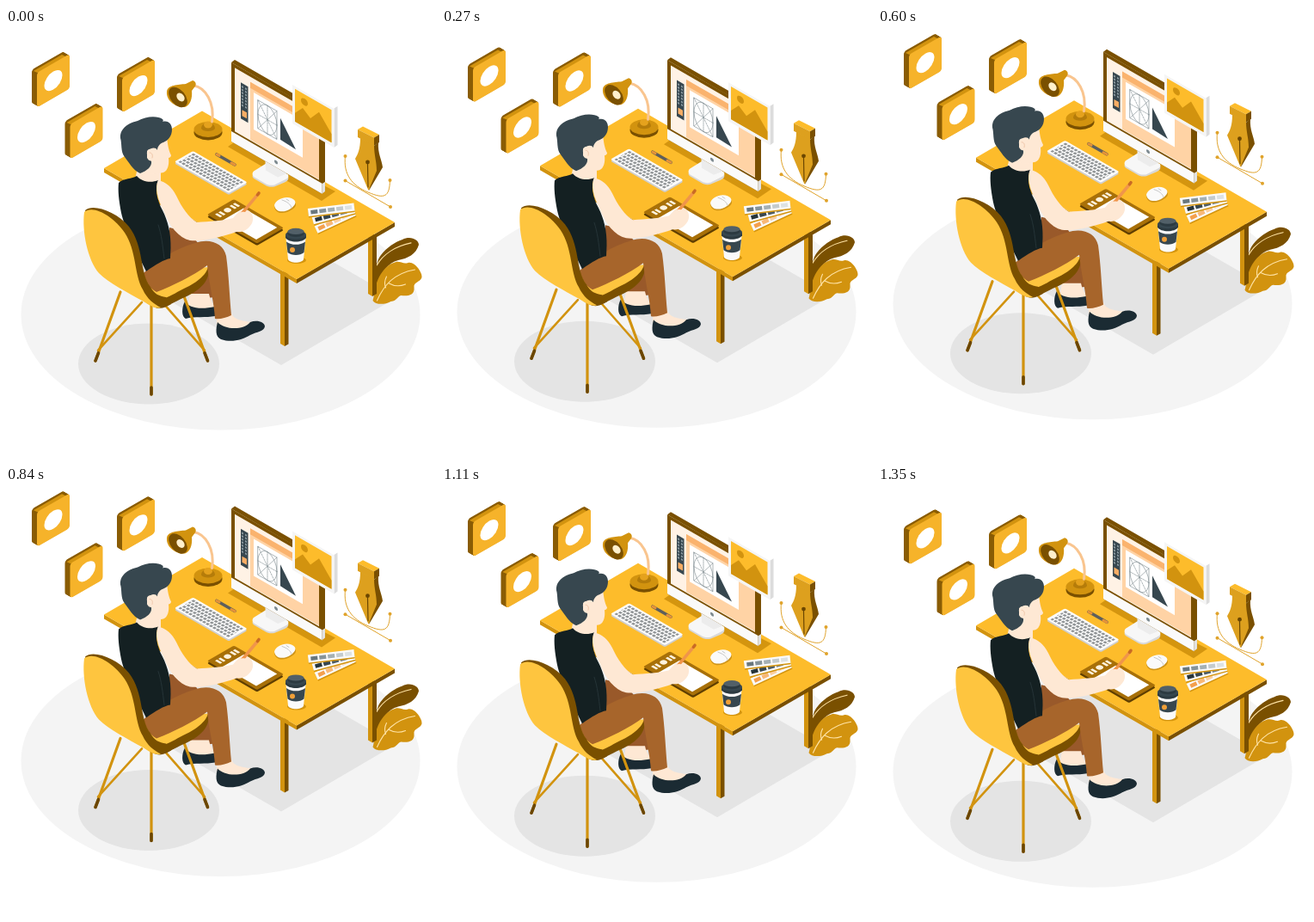
An HTML page that plays this animation: 500 by 500 pixels, repeating every 1380 ms.

```html
<!DOCTYPE html>
<html lang="en">
<head>
<meta charset="utf-8">
<title>Designer at a desk</title>
<style>
  html, body { margin: 0; width: 100%; height: 100%; overflow: hidden; background: #fff; }
  svg { display: block; width: 100vw; height: 100vh; }
  .gold { fill: #d2930f; }
  .brown { fill: #7a5000; }
  .sun { fill: #fdbc2b; }
  .skin { fill: #fee8d4; }
  .slate { fill: #37474f; }
  .ink { fill: #142022; }
  .shoe { fill: #1b2b33; }
  .line { fill: none; stroke-linecap: round; stroke-linejoin: round; }
</style>
</head>
<body>
<svg viewBox="0 0 500 500" xmlns="http://www.w3.org/2000/svg">
  <g id="room">
    <ellipse cx="249.500" cy="333" rx="232" ry="134.500" fill="#f4f4f4"/>
    <ellipse cx="166" cy="390.500" rx="82" ry="47" fill="#e4e4e4"/>
    <path d="M320 392L453 314L262 204L122 278Z" fill="#e4e4e4"/>

    <g id="plant">
      <path class="brown" d="M430 299C429 282 431 270 436 264C443 255 452 249 461 246C470 241 480 246 480 252C477 263 467 268 456 270C444 273 436 284 433 301Z"/>
      <path class="line" d="M431 276C438 264 452 254 471 250" stroke="#ffe3a6" stroke-width="1.200"/>
      <g transform="translate(-.5 5)">
        <path class="gold" d="M428 308C430 288 439 271 454 267C459 266 463 270 468 268C476 266 485 280 484 285C482 291 474 290 475 297C476 306 467 307 460 306C455 307 456 312 448 313C441 317 430 317 427 312Z"/>
        <path class="line" d="M432 312C440 294 452 280 476 276M442 297C440 292 441 288 443 284M446 292C453 296 460 295 465 293" stroke="#ffe3a6" stroke-width="1.100"/>
      </g>
    </g>

    <g id="desk">
      <path class="gold" d="M319 283H324V370L319 367ZM421 240H426V312L421 309Z"/>
      <path class="brown" d="M324 283H328.500V367.500L324 370ZM426 240H431V309L426 312Z"/>
      <path class="gold" d="M114 163L338 292V297L114 168Z"/>
      <path class="brown" d="M338 292L452 226V231L338 297Z"/>
      <path class="sun" d="M114 163L228 96.500L452 226L338 292Z"/>
    </g>

    <g id="lamp">
      <ellipse class="brown" cx="235" cy="121.500" rx="16.500" ry="9"/>
      <ellipse class="gold" cx="235" cy="118" rx="16.500" ry="9"/>
      <path d="M227 117C227 108 243 108 243 117C241 121 229 121 227 117Z" fill="#b57c0a"/>
      <ellipse cx="235" cy="112.500" rx="5" ry="4" fill="#e5a21d"/>
      <path class="line" d="M218 67C232 69 243 87 239.500 109" stroke="#f9c58f" stroke-width="3"/>
      <path class="gold" d="M187 74C188 66 200 66 209 65L217 61C221 62 222 66 219 69L216 73C217 82 214 90 208 92C197 93 186 84 187 74Z"/>
      <ellipse class="brown" cx="200" cy="80.500" rx="8.500" ry="13.500" transform="rotate(-40 200 80.500)"/>
      <ellipse cx="203" cy="80.500" rx="4" ry="5.500" fill="#fff0cc" transform="rotate(-40 203 80.500)"/>
    </g>

    <g id="monitor">
      <path d="M258 138L268 131L383 190L367 201Z" fill="#d4950f"/>
      <g transform="translate(0 -2.500)">
        <path d="M288 172L304 162L328 175C329 178 328 180 324 182L312 187C308 188 304 187 301 185L289 178C286 176 286 174 288 172Z" fill="#d8d8d8"/>
        <path d="M288 169L304 159L328 173C329 176 328 177 324 179L312 185C308 186 304 185 301 183L289 176C286 174 286 171 288 169Z" fill="#f7f7f7"/>
        <path d="M301 148L326 162V172L316 176L302 168Z" fill="#ececec"/>
      </g>
      <path class="brown" d="M262 40L266 37L371 97.500V179L367 182V101Z"/>
      <path d="M367 181.500L371 179V190L367 193Z" fill="#e2e2e2"/>
      <g transform="matrix(1 .577 0 1 262 40)">
        <rect class="brown" width="105.500" height="92"/>
        <rect y="80" width="105.500" height="12" fill="#fafafa"/>
        <rect x="4" y="4" width="98" height="74" fill="#fff2e5"/>
        <rect x="22" y="10" width="80" height="67" fill="#ffd3a5"/>
        <rect x="22" y="10" width="80" height="7" fill="#fab36e"/>
        <rect x="26" y="20" width="57" height="43" fill="#fff"/>
        <rect class="slate" x="11" y="17" width="8.500" height="42"/>
        <path d="M13 20V44M17 20V44" stroke="#8b9aa0" stroke-width="2" stroke-dasharray="2 1.600"/>
        <rect x="12.500" y="48" width="5.500" height="7" fill="#f7ad64"/>
        <g class="line" stroke="#7d898f" stroke-width=".55">
          <rect x="31" y="26" width="22" height="33"/>
          <ellipse cx="42" cy="42.500" rx="11" ry="16.500"/>
          <path d="M31 26L53 59M53 26L31 59M42 26V59M31 42.500H53" stroke-dasharray="1.500 1"/>
        </g>
        <path class="slate" d="M57 32V57L75 58Z"/>
        <circle cx="52" cy="86" r="2" fill="#7c898f"/>
      </g>
    </g>

    <g id="card">
      <path d="M333 66L337 63.500L385.500 91L381.500 94Z" fill="#fff"/>
      <path d="M381.500 93.500L385.500 91V136L381.500 139Z" fill="#dcdcdc"/>
      <g transform="matrix(1 .577 0 1 333 66)">
        <rect width="48.500" height="45" fill="#f5f5f5"/>
        <rect class="sun" x="3" y="3" width="42.500" height="38"/>
        <circle class="gold" cx="14" cy="12" r="4"/>
        <path class="gold" d="M3 31L12 20L21 27L31 14L45.500 31V41H3Z"/>
      </g>
    </g>

    <g id="keyboard" transform="matrix(.866 .5 -.866 .5 217.500 143)">
      <rect x="2" y="2" width="73" height="25" rx="2" fill="#cfcfcf"/>
      <rect width="73" height="25" rx="2" fill="#fbfbfb"/>
    </g>

    <path class="line" d="M245 147L266 159" stroke="#5e5f5c" stroke-width="3.600"/>
    <path class="line" d="M245 147L248 148.500M262 157L266 159" stroke="#e79338" stroke-width="3"/>

    <g transform="matrix(.866 .5 -.866 .5 265 199)">
      <rect x="2.500" y="2.500" width="67" height="36" rx="2" fill="#5f3e00"/>
      <rect width="67" height="36" rx="2" fill="#a87008"/>
      <rect x="17" y="4" width="45" height="28" fill="#fff"/>
      <path d="M5 29H12M5 24.500H12M5 9.500H12M5 5H12" stroke="#fff3de" stroke-width="2.800"/>
      <circle cx="8.500" cy="17" r="3.600" fill="#fff3de"/>
    </g>

    <path d="M312 208C314 200 326 196 333 200C340 204 337 209 331 212C323 217 313 216 312 208Z" fill="#cf9418"/>
    <path d="M312 206C314 199 325 195 332 198C339 201 337 206 331 210C324 215 313 215 312 206Z" fill="#fafafa"/>
    <path class="line" d="M321 200C327 202 331 205 332 209M326 199L329 201" stroke="#c7c7c7"/>

    <g id="swatches"></g>

    <g id="cup" transform="translate(-1 0)">
      <ellipse cx="339" cy="270" rx="11" ry="4" fill="#d4950f"/>
      <path d="M326.500 244L329 269C331 274 345 274 347 269L349.500 244Z" fill="#fafafa"/>
      <path class="slate" d="M327 248.500C333 253 343 253 349 248.500L347.500 261C343 265 333 265 328.500 261Z"/>
      <circle cx="334" cy="258" r="3" fill="#f0a038"/>
      <path d="M326 241V244C330 250 346 250 350 244V241Z" fill="#2c3a41"/>
      <ellipse class="slate" cx="338" cy="240.500" rx="12" ry="5"/>
      <path d="M328.500 236.500V240C332 244 344 244 347.500 240V236.500Z" fill="#2c3a41"/>
      <ellipse cx="338" cy="236.500" rx="9.500" ry="3.600" fill="#526068"/>
    </g>

    <g id="farleg">
      <path d="M207 296L236 284L242 313L219 316Z" fill="#99592a"/>
      <path class="skin" d="M214 309L236 309C238 319 243 323 243 327L226 331L211 326Z"/>
      <path class="shoe" d="M208 318C212 325 225 328 243 324V335C233 337 219 335 209 338C204 336 204 325 208 318Z"/>
    </g>

    <g class="line" stroke="#d2930f">
      <path d="M133 307L104 387M169 322V426M207 312L234.500 387" stroke-width="3.200"/>
      <path d="M158 319L107 375M181 318L231 375" stroke-width="2.600"/>
    </g>
    <path class="line" d="M107.500 378L104 387M169 418V426M231 378L234.500 387" stroke="#6b4600" stroke-width="3.600"/>
    <path class="brown" d="M156 285L236 279C237 296 223 306 208 313C194 319 184 327 174 325Z"/>
    <path d="M158 286L235 278C232 290 216 299 203 305C190 312 180 319 173 312C165 304 161 296 158 286Z" fill="#fec53f"/>

    <g id="legs" transform="translate(0 1)">
      <path d="M190 231C205 234 217 240 224 250L190 272Z" fill="#99592a"/>
      <path class="skin" d="M245 333L262 330C264 339 278 340 288 341C284 351 268 353 258 350C250 348 246 347 245 344Z"/>
      <path class="shoe" d="M246 341C254 350 276 351 284 341C292 338 301 341 301 346C300 352 292 352 284 356C274 362 262 365 250 361C243 358 244 349 246 341Z"/>
      <path d="M160 284C176 268 199 255 220 249C238 243 253 250 256 264C259 285 260 312 262 333C256 336 248 338 243 337C242 318 237 302 234 275C218 287 193 299 175 306C167 302 163 294 160 284Z" fill="#a7652b"/>
    </g>

    <g id="torso">
      <path class="skin" d="M154 158L180 162V178C176 184 160 184 150 176Z"/>
      <path class="ink" d="M131 180C138 174 146 176 152 172C159 180 170 180 177 177C173 186 175 199 182 212C188 224 192 238 191.500 256L191 268C184 269 174 275 163 283C156 268 140 240 134 215C131 200 130 188 131 180Z"/>
      <path class="line" d="M184 268C182 252 181 241 177 229" stroke="#2a393d" stroke-width=".8"/>
    </g>

    <path class="brown" d="M92 212C101 204 128 213 143 231C161 254 155 285 168 301C172 309 178 312 186 313L192 321C184 326 178 328 169 323C140 306 96 230 92 212Z"/>
    <path d="M91 214C102 205 126 220 138 238C152 259 149 287 159 304C164 315 172 321 180 325C174 327 168 323 160 318C142 308 119 296 108 285C95 270 88 236 91 214Z" fill="#fec53f"/>

    <g id="head" transform="translate(-1 1)">
      <path class="skin" d="M166 132L188 125C189 135 190 141 193 147C193 149 191 150 190 150C191 158 189 165 184 167C176 169 167 170 160 164Z"/>
      <path class="slate" d="M134 127C133 115 145 109 154 107C164 101 178 101 183 105C184 106 184 107 183 108C190 106 194 111 194 117C194 125 189 130 184 132C180 133 177 137 177 141C175 137 169 138 165 143C164 148 168 151 170 154C171 160 165 165 157 168C148 164 144 155 139 149C134 143 136 133 134 127Z"/>
      <path class="skin" d="M165 142C169 137 175 140 175 147C174 154 168 156 165 150Z"/>
      <path class="line" d="M168 144C171 144 172 147 171 150" stroke="#efc6a9"/>
    </g>

    <g id="arm">
      <path class="skin" d="M177 177C186 179 193 185 198 195C204 208 213 221 222 226C236 225 253 224 264 221C269 216 273 210 279 211C286 213 289 220 286 227C282 234 276 238 268 237C251 243 227 249 214 247C201 244 190 231 183 212C176 199 173 185 177 177Z"/>
      <path class="line" d="M292.500 194L275 215" stroke="#f0954a" stroke-width="3.600"/>
      <path class="line" d="M294 192L292.500 194" stroke="#c96b24" stroke-width="3.600"/>
      <path class="skin" d="M266 222C270 213 277 212 283 216C288 220 287 228 281 232C274 236 267 232 266 222Z"/>
    </g>
  </g>

  <g id="tiles"></g>

  <g id="pen">
    <g class="line" stroke="#e0a32b" stroke-width="1">
      <path d="M394.500 149C392 170 402 183 421 191S446 197 446.500 177"/>
      <path d="M394.500 177.500L447 208"/>
    </g>
    <g fill="#e0a32b">
      <circle cx="394.500" cy="149" r="2"/><circle cx="394.500" cy="177.500" r="2"/>
      <circle cx="446.500" cy="177" r="2"/><circle cx="447" cy="208" r="2"/>
    </g>
    <path class="brown" d="M427 138L433 133C432 146 437 153 438 162L422 189Z"/>
    <path d="M412 128L428 136C428 148 431 155 431 166L421.500 189L406 152C409 147 412 141 412 128Z" fill="#dda01e"/>
    <path class="line" d="M420.500 158L421 185" stroke="#6b4600" stroke-width="1.200"/>
    <circle cx="420.500" cy="156" r="2.400" fill="#6b4600"/>
    <path d="M409 118L415 114.500L434 124L428 127.500Z" fill="#fdbc2b"/>
    <path d="M409 118L428 127.500V137L409 127Z" fill="#dda01e"/>
    <path class="brown" d="M428 127.500L434 124V133L428 137Z"/>
  </g>
</svg>
<script>
  const LOOP = 1380, STEP = 30, REST = 90;
  const el = id => document.getElementById(id);
  const add = (id, markup) => el(id).insertAdjacentHTML('beforeend', markup);
  const range = n => [...Array(n).keys()];

  // Keyboard rows
  add('keyboard', range(5).map(r =>
    `<path d="M3 ${4 + r * 4.3}H70" stroke="#8f9395" stroke-width="2.900" stroke-dasharray="3.200 1.400" stroke-dashoffset="${r * 1.3}"/>`
  ).join(''));

  // Fan of colour strips
  const strip = (y, angle, len, colors) =>
    `<g transform="translate(405 ${y}) rotate(${angle})">
      <rect x="${-len}" y="-3" width="${len}" height="9" fill="#d4950f"/>
      <rect x="${-len}" y="-4.500" width="${len}" height="9" fill="#fafafa"/>
      ${colors.map((c, i) => `<rect x="${3 + i * 10 - len}" y="-2.300" width="8" height="4.600" fill="${c}"/>`).join('')}
    </g>`;
  add('swatches',
    strip(214, -25, 49, ['#f4a04d', '#f8b877', '#fbcfa0', '#fde2c6']) +
    strip(211, -15, 50, ['#26343a', '#37474f', '#4e5d65', '#75838a']) +
    strip(208, -7, 54, ['#69777d', '#87949a', '#a5b0b4', '#c4cbce', '#dde2e4']));

  // Extruded tiles
  const tile = (x, y) => {
    const face = (d, fill) =>
      `<rect width="38" height="40.500" rx="3.500" fill="${fill}" transform="matrix(1 -.577 0 1 ${x - d} ${y - d * 0.577})"/>`;
    return range(12).map(i => face(6 - i / 2, '#8a5c04')).join('') +
      `<path class="gold" d="M${x - 4} ${y - 2}L${x + 29} ${y - 21}L${x + 35} ${y - 18}L${x + 3} ${y + 1}Z"/>` +
      face(0, '#f6b32a') +
      `<circle cx="19" cy="20" r="10.500" fill="#fff" transform="matrix(1 -.577 0 1 ${x} ${y})"/>`;
  };
  add('tiles', tile(36, 52) + tile(135, 58) + tile(74.5, 112));

  const movers = [
    { node: el('room'), rise: 14, lag: 68 },
    { node: el('tiles'), rise: 23, lag: 45 },
    { node: el('pen'), rise: 30, lag: 45 }
  ];

  function draw(now) {
    const raw = now % LOOP;
    const t = raw < REST ? REST / 2 : Math.floor(raw / STEP) * STEP;
    for (const { node, rise, lag } of movers) {
      const y = -rise * (1 - Math.cos((t - lag) / LOOP * 2 * Math.PI)) / 2;
      node.setAttribute('transform', `translate(0 ${y.toFixed(2)})`);
    }
  }

  const start = performance.now();
  function tick() {
    draw(performance.now() - start);
    requestAnimationFrame(tick);
  }
  tick();
</script>
</body>
</html>
```
